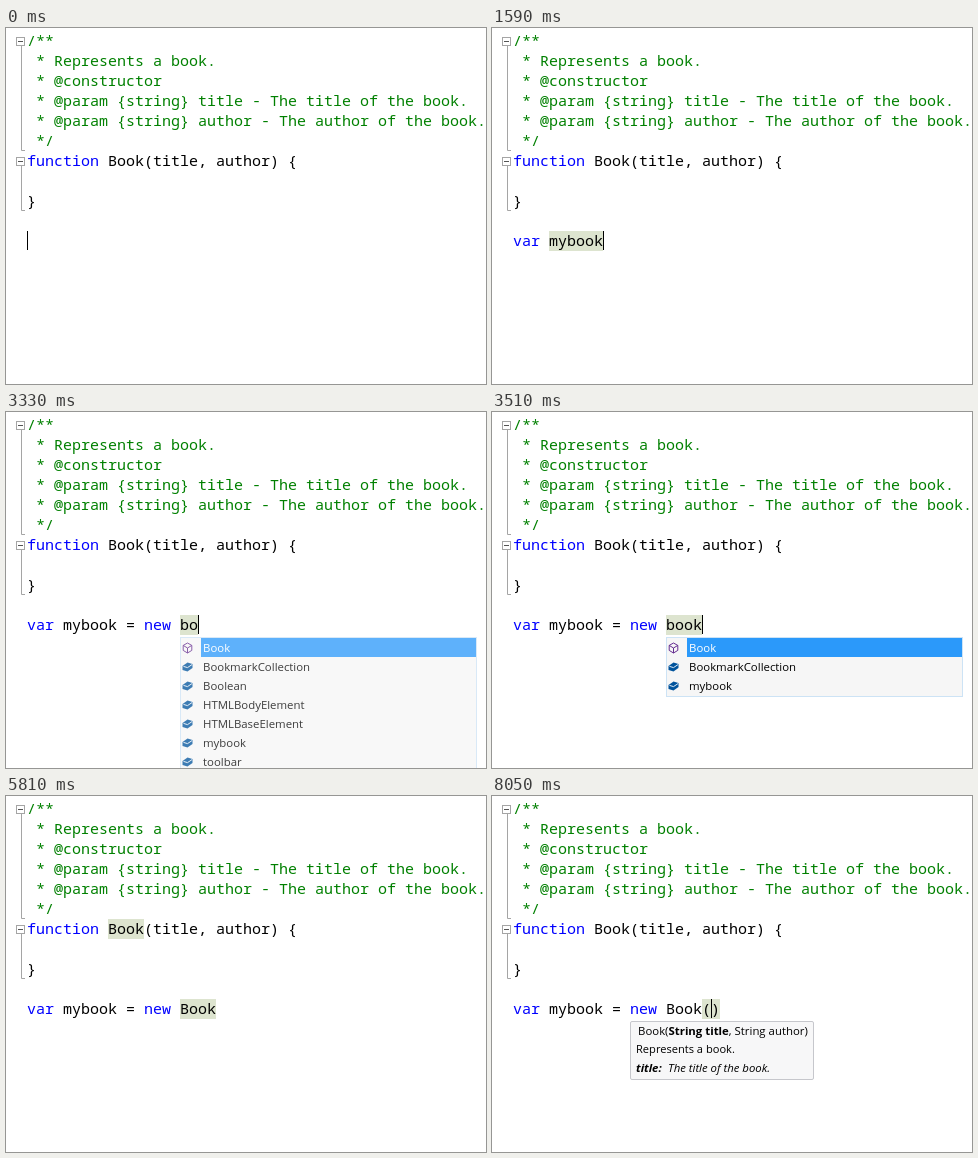
Write an HTML page that moves like this. It is 480 by 356 pixels and loops after 8.65 s.

```html
<!DOCTYPE html>
<html lang="en">
<head>
<meta charset="utf-8">
<title>Code completion</title>
<style>
  html, body { margin: 0; width: 100%; height: 100%; overflow: hidden; background: #fff; }
  svg { display: block; }
  text { white-space: pre; }
  .code { font: 500 15px "Noto Sans Mono", "DejaVu Sans Mono", monospace; }
  .ui { font: 500 11.4px "Open Sans", "Noto Sans", sans-serif; fill: #000; }
  .small { font-size: 11.1px; }
  .bold { font-weight: 700; }
  .italic { font-style: italic; }
</style>
</head>
<body>
<svg id="stage" width="480" height="356" viewBox="0 0 480 356"></svg>
<script>
const LOOP = 8650, LEFT = 21, CHAR = 9, LINE = 20, TOP = 3, ROW = 19;
const GREEN = '#008000', BLUE = '#0000ff', MARK = '#dde4cf';
const stage = document.getElementById('stage');

function add(parent, tag, attrs = {}, text) {
  const el = document.createElementNS('http://www.w3.org/2000/svg', tag);
  for (const k in attrs) el.setAttribute(k, attrs[k]);
  if (text !== undefined) el.textContent = text;
  parent.append(el);
  return el;
}
const rect = (p, x, y, width, height, fill) => add(p, 'rect', { x, y, width, height, fill });
const frameBox = (p, x, y, w, h, fill, stroke, rx = 0) =>
  add(p, 'rect', { x: x + .5, y: y + .5, width: w - 1, height: h - 1, fill, stroke, rx });
const stroke = (p, d, color) => add(p, 'path', { d, stroke: color, fill: 'none' });

// Colours the keywords and leaves the rest in the base colour.
function fillCode(el, source, base = '#000') {
  el.replaceChildren();
  for (const part of source.split(/\b(var|new|function)\b/)) {
    if (part) add(el, 'tspan', { fill: /^(var|new|function)$/.test(part) ? BLUE : base }, part);
  }
}
const codeLine = row => add(stage, 'text', { class: 'code', x: LEFT, y: TOP + row * LINE + 15 });

const marks = add(stage, 'g');

const comment = [
  '/**',
  ' * Represents a book.',
  ' * @constructor',
  ' * @param {string} title - The title of the book.',
  ' * @param {string} author - The author of the book.',
  ' */'
];
comment.forEach((s, i) => { const el = codeLine(i); el.textContent = s; el.setAttribute('fill', GREEN); });
fillCode(codeLine(6), 'function Book(title, author) {');
fillCode(codeLine(8), '}');

// Outlining margin
function fold(y, end) {
  stroke(stage, `M15.5 ${y + 9}V${end + .5}H19`, '#a5a5a5');
  frameBox(stage, 10, y, 9, 9, '#fff', '#a5a5a5');
  stroke(stage, `M12 ${y + 4.5}H17`, '#555');
}
fold(9, 122);
fold(129, 182);

// Typed line: [time, number of characters]
const typed = 'var mybook = new book';
const keys = [
  [0, 0], [130, 1], [490, 2], [640, 3], [700, 4], [790, 5], [950, 6],
  [1240, 7], [1360, 8], [1480, 9], [1590, 10], [1950, 11], [2010, 12],
  [2240, 13], [2300, 14], [2530, 15], [2630, 16], [2720, 17],
  [2980, 18], [3270, 19], [3390, 20], [3510, 21]
];
const PICK = 5330, CALL = 6110;
const caretOff = [[3870, 4340], [4900, PICK], [5810, CALL], [6460, 7090], [7590, 8050]];
const within = (t, [a, b]) => t >= a && t < b;

const input = codeLine(10);
const caret = rect(stage, LEFT, 203, 1, 19, '#000');
const wordMark = rect(marks, 0, 203, 0, 20, MARK);
const nameMark = rect(marks, 102, 123, 36, 20, MARK);
const pairMark = rect(marks, 210, 203, 18, 20, MARK);

// Popups fade in over `rise` and out over `fall`.
const popups = [];
function popup(from, to, rise, fall) {
  const g = add(stage, 'g');
  popups.push({ g, from, to, rise, fall });
  return g;
}

function icon(g, name, x, y) {
  if (name === 'Book') {
    stroke(g, `M${x} ${y - 5}l4.3 2.4v5L${x} ${y + 5}l-4.3 -2.6v-5zM${x - 4.3} ${y - 2.6}L${x} ${y}l4.3 -2.6M${x} ${y}v5`, '#652d90');
    return;
  }
  add(g, 'path', { d: `M${x - 5} ${y - 1}l5 -3.5 5 1.5v4l-5 3.5 -5 -1.5z`, fill: '#00539c' });
  stroke(g, `M${x - 4} ${y - .6}l4 1.2 4.5 -3`, '#e4eef7');
}

const label = (g, x, y, text, style = '') => add(g, 'text', { class: 'ui ' + style, x, y }, text);

function list(x, width, names, selected, from, to, rise, fall) {
  const g = popup(from, to, rise, fall);
  frameBox(g, x, 225, width, names.length * ROW + 3, '#f6f6f6', '#cde3f5');
  names.forEach((name, i) => {
    const y = 226 + i * ROW, on = name === selected;
    if (on) rect(g, x + 21, y, width - 22, ROW, '#2b99fa');
    icon(g, name, x + 7.5, y + 10);
    const el = label(g, x + 23, y + 14, name);
    if (on) el.style.fill = '#fff';
  });
}

list(21, 283, ['CanvasGradient', 'CanvasPattern', 'CanvasRenderingContext2D', 'eval',
  'HTMLCanvasElement', 'ValidityState', 'var'], 'var', 490, 640, 150, 60);
list(138, 297, ['new'], 'new', 2530, 2630, 90, 60);
list(174, 297, ['Book', 'BookmarkCollection', 'Boolean', 'HTMLBodyElement',
  'HTMLBaseElement', 'mybook', 'toolbar'], 'Book', 3270, 3390, 120, 0);
list(174, 297, ['Book', 'BookmarkCollection', 'Boolean', 'mybook'], 'Book', 3390, 3510, 0, 0);
list(174, 297, ['Book', 'BookmarkCollection', 'mybook'], 'Book', 3510, PICK, 0, 220);

function tip(x, y, w, h, from, to, rise, fall) {
  const g = popup(from, to, rise, fall);
  frameBox(g, x, y, w, h, '#f7f7f8', '#c6c7cc', 1.5);
  return g;
}

const info = tip(2, 226, 172, 38, 4100, PICK, 220, 220);
label(info, 6, 242, 'Book(String title, String author)');
label(info, 6, 257, 'Represents a book.', 'small');

const help = tip(138, 225, 184, 59, CALL, LOOP, 90, 0);
const signature = label(help, 146, 239, 'Book(');
add(signature, 'tspan', { class: 'bold' }, 'String title');
add(signature, 'tspan', {}, ', String author)');
label(help, 144, 257, 'Represents a book.', 'small');
label(help, 144, 276, 'title:', 'bold italic');
label(help, 176, 276, 'The title of the book.', 'italic');

const show = (el, on) => { el.style.display = on ? '' : 'none'; };

function opacity(p, t) {
  if (t < p.from || t >= p.to + p.fall) return 0;
  if (t >= p.to) return 1 - (t - p.to) / p.fall;
  return p.rise ? Math.min(1, (t - p.from + 30) / p.rise) : 1;
}

let shown = null;
function draw(t) {
  let count = 0;
  for (const [at, n] of keys) if (t >= at) count = n;
  let line = typed.slice(0, count);
  if (t >= PICK) line = line.replace(/book$/, 'Book');
  if (t >= CALL) { line += '()'; count++; }
  if (line !== shown) fillCode(input, shown = line);

  const caretX = LEFT + count * CHAR;
  caret.setAttribute('x', caretX);
  show(caret, !caretOff.some(span => within(t, span)));

  const start = within(t, [790, 1950]) ? 57 : within(t, [2980, CALL]) ? 174 : caretX;
  wordMark.setAttribute('x', start);
  wordMark.setAttribute('width', caretX - start);
  show(nameMark, within(t, [5580, CALL]));
  show(pairMark, t >= CALL);

  for (const p of popups) {
    const o = opacity(p, t);
    show(p.g, o > 0);
    p.g.setAttribute('opacity', o);
  }
}

const begin = performance.now();
function tick() {
  draw((performance.now() - begin) % LOOP);
  requestAnimationFrame(tick);
}
tick();
</script>
</body>
</html>
```
